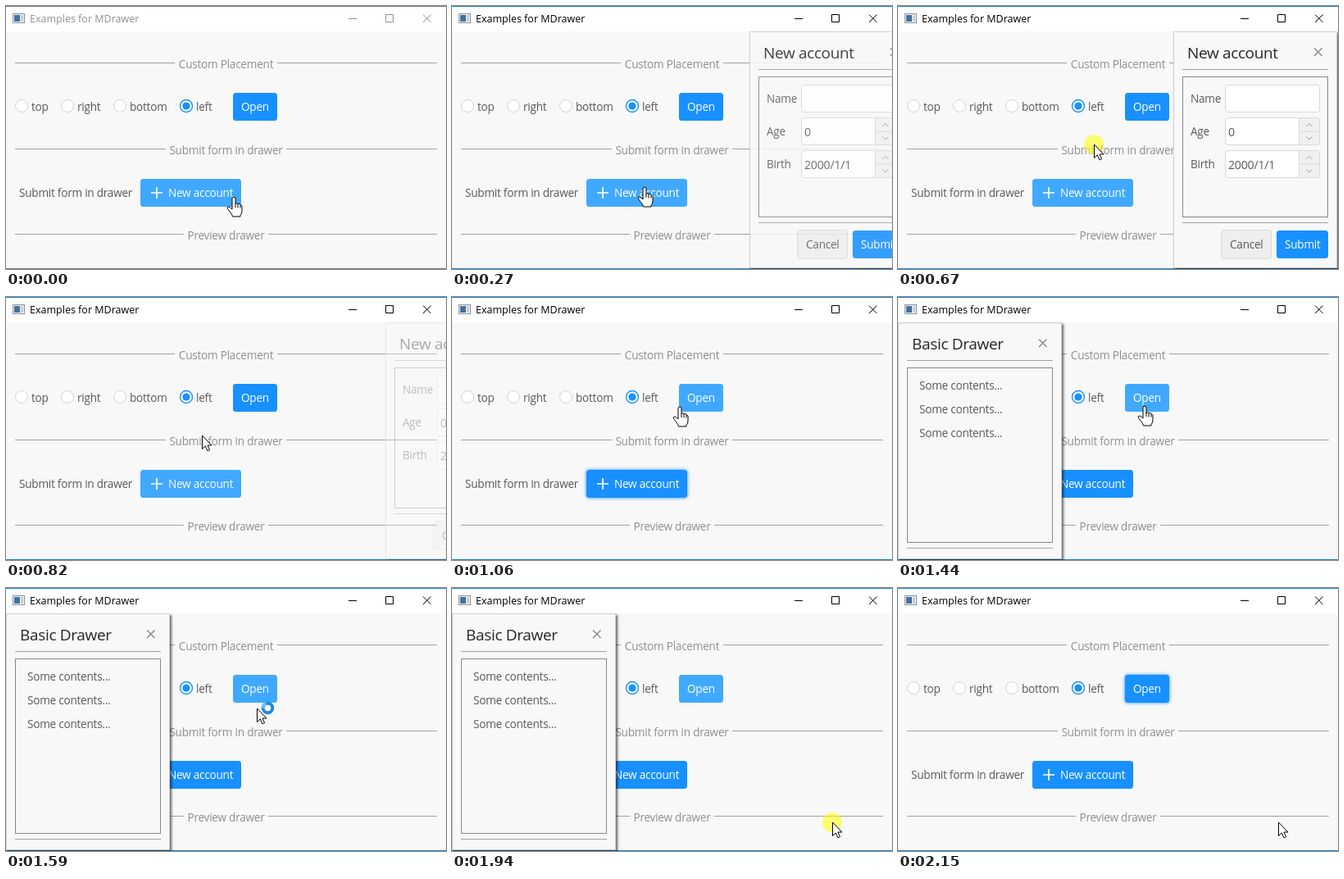
Recreate the animation shown at these times as an HTML page. Size 537x321 px, loop 2.18 s.

```html
<!DOCTYPE html>
<html lang="en">
<head>
<meta charset="utf-8">
<title>Drawer examples</title>
<style>
html, body { margin: 0; width: 100%; height: 100%; overflow: hidden; background: #f8f8f8; }
svg { display: block; }
text { font: 13.6px "Open Sans", "Noto Sans", sans-serif; letter-spacing: -.018em; fill: #595959; white-space: pre; }
.caption { font-size: 12.5px; letter-spacing: 0; fill: #000; }
.section { fill: #8f8f8f; text-anchor: middle; }
.heading { font-size: 19px; fill: #262626; }
.value { font-size: 14.2px; }
.rule { stroke: #a0a0a0; fill: none; }
.box { fill: #fff; stroke: #d9d9d9; }
.frame { fill: none; stroke: #828790; }
.panel { fill: #f8f8f8; stroke: #cfcfcf; filter: drop-shadow(2px 2px 1.5px rgba(0,0,0,.6)); }
.icon { fill: none; stroke: #000; }
.edge { stroke: #1883d7; }
.inactive .caption { fill: #8f8f8f; }
.inactive .icon { stroke: #8f8f8f; }
.inactive .edge { stroke: #777; }
.button rect { fill: #1890ff; }
.button text { fill: #fff; }
.hover rect { fill: #40a9ff; }
.glow rect { filter: drop-shadow(0 0 2px #1890ff); }
.cursor { fill: #fff; stroke: #000; stroke-linejoin: round; }
</style>
</head>
<body>
<svg id="stage" width="537" height="321" viewBox="0 0 537 321"></svg>
<script>
const stage = document.getElementById('stage');

const text = (x, y, s, cls = '') => `<text x="${x}" y="${y}" class="${cls}">${s}</text>`;
const rect = (x, y, w, h, cls, r = 0) =>
  `<rect x="${x}" y="${y}" width="${w}" height="${h}" rx="${r}" class="${cls}"/>`;
const path = (d, cls, extra = '') => `<path d="${d}" class="${cls}" ${extra}/>`;
const button = (id, x, y, w, label, inset = 10, extra = '') =>
  `<g id="${id}" class="button">${rect(x, y, w, 34, '', 3.5)}${extra}${text(x + inset, y + 22, label)}</g>`;

const section = (y, left, right, label) =>
  path(`M11 ${y}.5H${left}M${right} ${y}.5H526`, 'rule') + text(268.5, y + 7, label, 'section');

const radio = (x, label, on) =>
  `<circle cx="${x}" cy="122" r="7.5" fill="#fff" stroke="${on ? '#1890ff' : '#d4d4d4'}" stroke-width="${on ? 1.4 : 1}"/>` +
  (on ? `<circle cx="${x}" cy="122" r="4.6" fill="#1890ff"/>` : '') + text(x + 12, 128, label);

const drawer = (id, title, bottom, body) => `<g id="${id}">
  ${rect(.5, 31.5, 199, 288, 'panel')}
  ${text(17, 64, title, 'heading')}
  ${path('M172 51.5l9.5 9.5m0-9.5l-9.5 9.5', '', 'stroke="#8c8c8c" stroke-width="1.5"')}
  ${path(`M11 77.5H189M11 ${bottom + 6}.5H189`, 'rule')}
  ${rect(11.5, 86.5, 177, bottom - 87, 'frame')}${body}</g>`;

const field = (y, label, value) => text(21, y + 22, label) + rect(63.5, y + .5, 115, 33, 'box', 3.5) +
  (value ? path(`M153.5 ${y + .5}h21.5q3.5 0 3.5 3.5v26q0 3.5-3.5 3.5h-21.5zm0 16.5h25`, '', 'fill="#f0f0f0" stroke="#d9d9d9"') +
    path(`M162.5 ${y + 11}l3.5-3.5 3.5 3.5m-7 12.500l3.5 3.5 3.5-3.5`, 'rule') +
    text(67, y + 23, value, 'value') : '');

const plus = path('M184 221v14m-7-7h14', '', 'stroke="#fff" stroke-width="1.7"');

stage.innerHTML = `
  ${rect(0, 0, 537, 31, '" fill="#fff')}
  ${rect(0, 31, 537, 290, '" fill="#f8f8f8')}
  ${path('M0 .5H537M0 320.5H537', 'edge')}
  ${rect(8.5, 9.5, 14, 11, '" fill="#f4f4f4" stroke="#8a8f94')}
  ${rect(10, 11, 7, 8, '" fill="#41719f')}
  ${rect(18, 11, 3, 8, '" fill="#c4ccd3')}
  ${text(29, 20, 'Examples for MDrawer', 'caption')}
  ${path('M418 15.5h10M463.500 10.500h9v9h-9z', 'icon')}
  ${path('M509 10.500l9.500 9.500m0-9.500l-9.500 9.500', 'icon')}
  ${section(69, 206, 331, 'Custom Placement')}
  ${radio(19, 'top')}${radio(75, 'right')}${radio(139, 'bottom')}${radio(220, 'left', true)}
  ${button('open', 277, 106, 54, 'Open')}
  ${section(174, 195, 342, 'Submit form in drawer')}
  ${text(16, 233, 'Submit form in drawer')}
  ${button('create', 164, 211, 123, 'New account', 34, plus)}
  ${section(278, 217, 320, 'Preview drawer')}
  ${drawer('form', 'New account', 258,
    field(96, 'Name') + field(136, 'Age', '0') + field(176, 'Birth', '2000/1/1') +
    rect(58.5, 273.5, 61, 35, '" fill="#eee" stroke="#d9d9d9', 3.5) + text(69, 296, 'Cancel') +
    button('submit', 126, 274, 63, 'Submit'))}
  ${drawer('basic', 'Basic Drawer', 300, [113, 142, 171].map(y => text(26, y, 'Some contents...')).join(''))}
  <g id="pointer">
    <circle id="click" r="12" fill="#ff0" fill-opacity=".55"/>
    ${path('M.5 0V16.500l3.800-3.600 2.700 6 2.600-1.200-2.600-5.700h5z', 'cursor', 'id="arrow"')}
    ${path('M-2 14V2a2 2 0 0 1 4 0V9a1.500 1.500 0 0 1 3 .5a1.500 1.500 0 0 1 3 1a1.300 1.300 0 0 1 2 1.500V17q0 3.500-2 5.500V24H-1.500q-.5-3-3-5.500L-7.500 14.500q-1-2.500 1-2.500 1.500 0 4.500 3zM2 9v4M5 9.500v4M8 10.500v3', 'cursor', 'id="hand"')}
    <g id="busy" fill="none" stroke-width="4">
      <circle cx="13.500" cy="-.5" r="5.800" stroke="#2388d8"/>
      <path d="M7.700 -.5a5.800 5.800 0 0 1 4-5.500" stroke="#5fc3f5"/>
    </g>
  </g>`;

const el = id => document.getElementById(id);
const show = (id, on) => el(id).setAttribute('visibility', on ? 'visible' : 'hidden');
const between = (t, a, b) => t >= a && t < b;
const clamp = v => Math.min(1, Math.max(0, v));
const outCubic = v => 1 - (1 - v) ** 3;

const LOOP = 2180, SLIDE = 100;
// time, x, y of the pointer tip
const track = [
  [0, 278, 233], [170, 235, 221], [360, 235, 221], [540, 239, 169], [840, 239, 169],
  [1190, 295, 119], [1360, 295, 119], [1520, 306, 147], [1620, 306, 147], [1880, 464, 286], [LOOP, 464, 286]
];

function pointerAt(t) {
  const i = track.findIndex(k => k[0] > t);
  const [t0, x0, y0] = track[i - 1], [t1, x1, y1] = track[i];
  const u = (t - t0) / (t1 - t0), e = u * u * (3 - 2 * u);
  return [x0 + (x1 - x0) * e, y0 + (y1 - y0) * e];
}

// The closing slide is the opening one played backwards.
const slide = (t, opens, closes) =>
  outCubic(t < closes ? clamp((t - opens) / SLIDE) : clamp(1 - (t - closes) / SLIDE));

function place(id, x, p) {
  el(id).setAttribute('transform', `translate(${Math.round(x)} 0)`);
  el(id).setAttribute('opacity', p);
  show(id, p > 0);
}

function draw(t) {
  const [x, y] = pointerAt(t);
  const onOpen = x >= 277 && x < 331 && y >= 106 && y < 140;
  const onCreate = x >= 164 && x < 287 && y >= 211 && y < 245;
  const hand = onOpen || onCreate;

  stage.classList.toggle('inactive', t < 150);
  el('create').classList.toggle('hover', t < 835);
  el('create').classList.toggle('glow', between(t, 150, 222) || between(t, 835, 1230));
  el('open').classList.toggle('hover', onOpen || between(t, 1330, 2030));
  el('open').classList.toggle('glow', between(t, 1230, 1330) || t >= 2030);

  const form = slide(t, 222, 735), basic = slide(t, 1330, 1930);
  place('form', 536 - 200 * form, form);
  place('basic', 200 * basic - 200, basic);

  el('pointer').setAttribute('transform', `translate(${Math.round(x)} ${Math.round(y)})`);
  show('hand', hand);
  show('arrow', !hand);
  show('busy', between(t, 1500, 1660));
  show('click', between(t, 150, 210) || between(t, 640, 730) || between(t, 1230, 1290) || between(t, 1890, 1950));
}

const start = performance.now();
function tick() {
  draw((performance.now() - start) % LOOP);
  requestAnimationFrame(tick);
}
tick();
</script>
</body>
</html>
```
